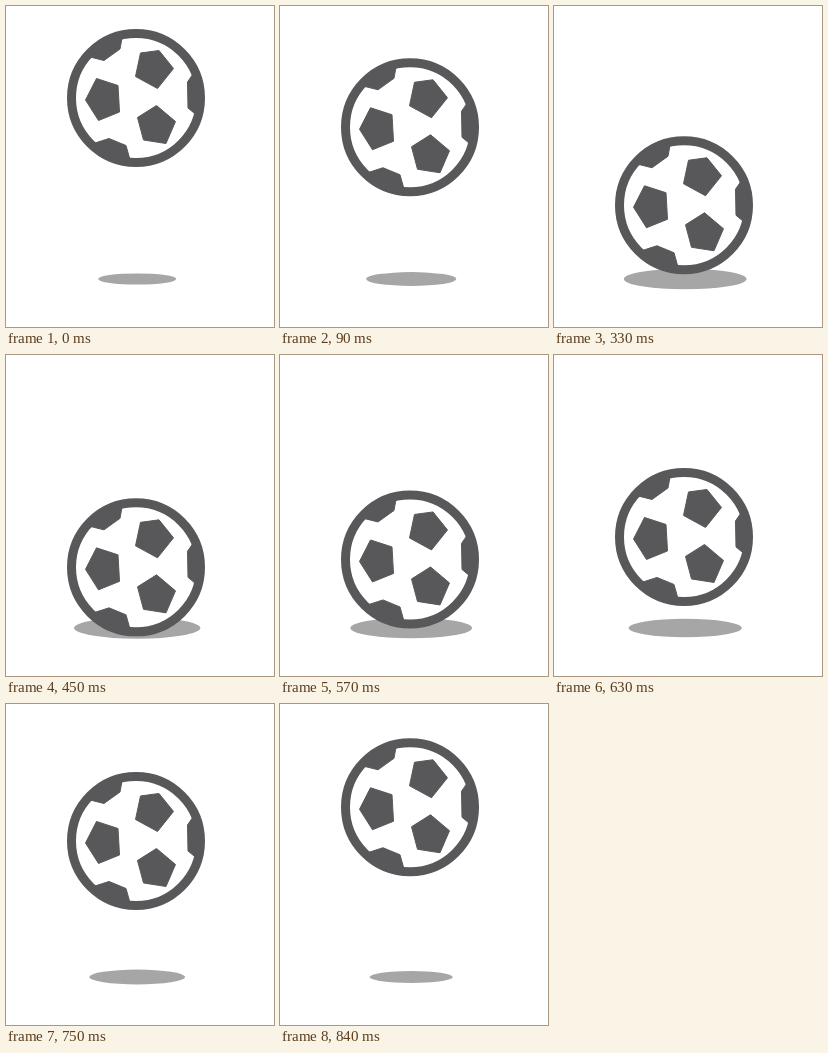
Animation, 268 px wide and 321 px high, one loop 870 ms. Source, as an HTML page:

```html
<!DOCTYPE html>
<html lang="en">
<head>
<meta charset="utf-8">
<title>Bouncing ball</title>
<style>
html, body { margin: 0; width: 100%; height: 100%; overflow: hidden; background: #fff; }
svg { display: block; width: 100vw; height: 100vh; }
</style>
</head>
<body>
<svg viewBox="0 0 268 321">
  <ellipse id="shadow" cx="131.2" cy="273" fill="#a6a6a6"/>
  <g id="ball">
    <circle r="64.5" fill="#fff" stroke="#58585a" stroke-width="9"/>
    <g transform="translate(-130 -92)" fill="#58585a" stroke="#58585a" stroke-linejoin="round">
      <path d="M134.5 47L153 44.5L167.5 62.5L151.5 82.5L129.5 70.5Z"/>
      <path d="M90.5 72.5L112 79.5L113.5 106L92.5 114.5L79.5 94Z"/>
      <path d="M150.5 99.5L169.5 115.5L160 137.5L137.5 134L131.5 111.5Z"/>
      <path d="M116 32L114 43L98 54.5L84 51L82 46Q97 32 116 29Z"/>
      <path d="M187 68L181.5 76L182 102L188 107L192 107Q197 88 191 69Z"/>
      <path d="M89 137L103 132.5L120 139.5L123.5 152L122 155Q102 153 87 140Z"/>
    </g>
  </g>
</svg>
<script>
const STEP = 30, LOOP = 870;
const ball = document.getElementById('ball');
const shadow = document.getElementById('shadow');

// Fall, settle into the ground, rise: [step, ball y, shadow rx, shadow ry]
const keys = [
  [0, 92, 39, 5.6],
  [12, 209, 63.4, 10.8],
  [18, 215.7, 63, 10.6],
  [29, 92, 39.4, 5.6]
];

function pose(step) {
  const i = keys.findIndex(k => step < k[0]);
  const a = keys[i - 1], b = keys[i];
  const u = (step - a[0]) / (b[0] - a[0]);
  return a.map((v, n) => v + (b[n] - v) * u);
}

function draw(ms) {
  const [, y, rx, ry] = pose(Math.floor((ms % LOOP) / STEP));
  ball.setAttribute('transform', `translate(130 ${y.toFixed(2)})`);
  shadow.setAttribute('rx', rx.toFixed(2));
  shadow.setAttribute('ry', ry.toFixed(2));
}

const start = performance.now();
function tick() {
  draw(performance.now() - start);
  requestAnimationFrame(tick);
}
tick();
</script>
</body>
</html>
```
